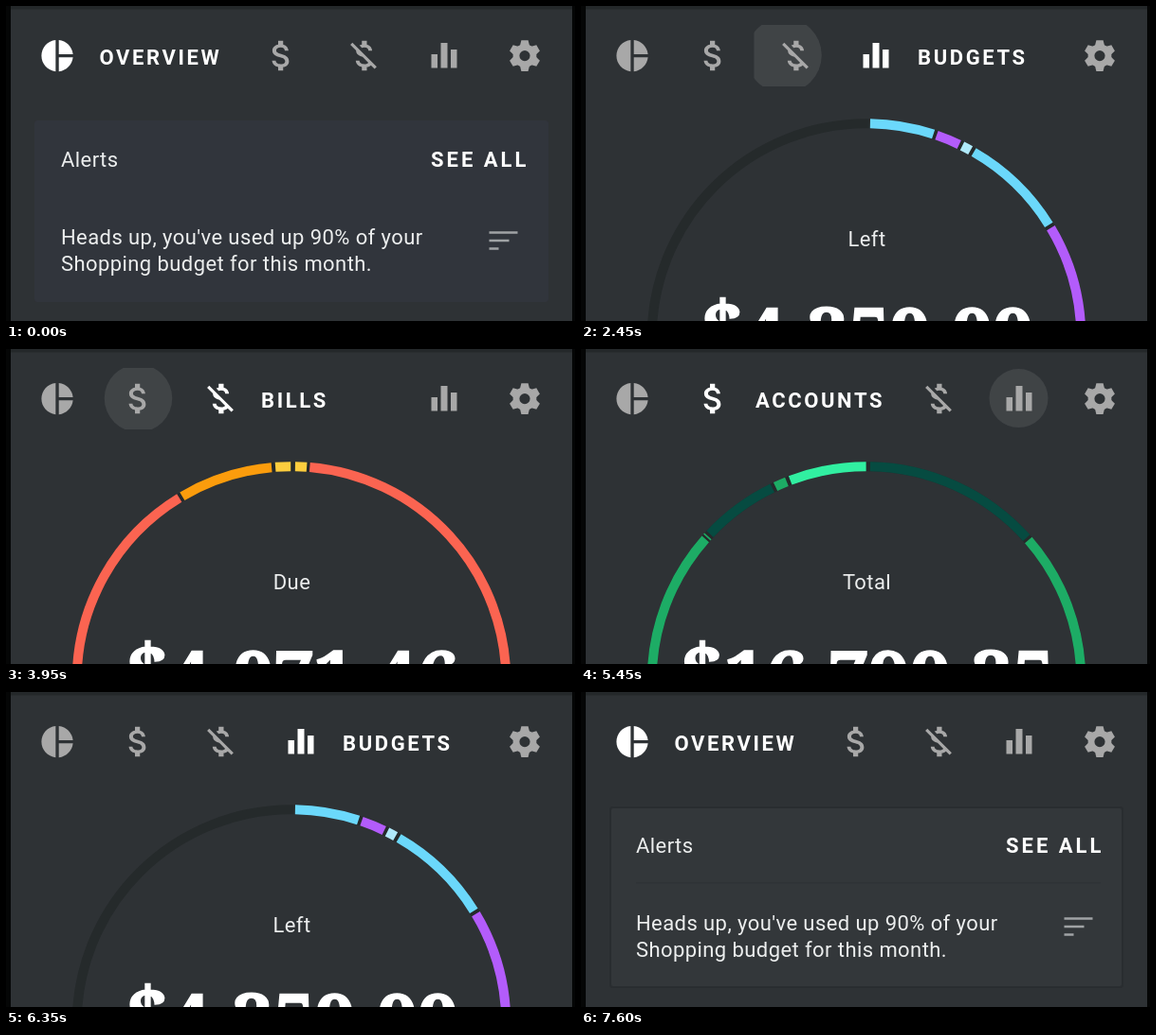
Write an HTML page that moves like this. It is 600 by 333 pixels and loops after 8000 ms.

```html
<!DOCTYPE html>
<html lang="en">
<head>
<meta charset="utf-8">
<title>Finance tabs</title>
<style>
  html, body { margin: 0; width: 100%; height: 100%; overflow: hidden; background: #2e3235; }
  svg { display: block; width: 100%; height: 100%; }
  text { font: 400 22px Roboto, "Open Sans", sans-serif; letter-spacing: .42px; fill: #eceeee; }
  .title { font-weight: 700; letter-spacing: 2.6px; fill: #fff; }
  .label, .amount { text-anchor: middle; }
  .amount { font: 700 77px "Noto Serif", "DejaVu Serif", serif; letter-spacing: 0; fill: #fff; stroke: #fff; stroke-width: 1.5; }
  .sign { font-size: 1.12em; }
  .ring { fill: none; stroke-width: 10; }
</style>
</head>
<body>
<svg viewBox="0 0 600 333">
  <defs>
    <clipPath id="cell"><rect x="-43.5" y="-32.5" width="87" height="65"/></clipPath>
  </defs>
  <rect width="600" height="333" fill="#2e3235"/>

  <g id="overview">
    <rect x="30" y="121" width="542" height="192" rx="3" fill="#292d30"/>
    <rect x="32" y="123" width="538" height="188" rx="2" fill="#33373a"/>
    <rect x="58" y="201" width="490" height="1.5" fill="#2f3336"/>
    <rect id="tint" x="30" y="121" width="542" height="192" rx="3" fill="#31353c"/>
    <text x="58" y="170">Alerts</text>
    <text x="448" y="169.5" class="title" style="letter-spacing:3px">SEE ALL</text>
    <text x="58" y="252">Heads up, you've used up 90% of your</text>
    <text x="58" y="279.5">Shopping budget for this month.</text>
    <path d="M509.5 239.5h30M509.5 248h21M509.5 256.5h10" stroke="#a0a3a5" stroke-width="2.6"/>
  </g>

  <g id="chart">
    <circle class="ring" cx="301" cy="350.5" r="226.3" stroke="#252a2b"/>
    <g id="arcs" transform="rotate(-90 301 350.5)"></g>
    <text id="label" class="label" x="301.5" y="253.5"></text>
    <text class="amount" x="301" y="374"><tspan class="sign">$</tspan><tspan id="amount"></tspan></text>
  </g>

  <g id="tabs"></g>

  <rect width="600" height="3.5" fill="#24282a"/>
  <rect width="5" height="333" fill="#050606"/>
  <rect x="597" width="3" height="333" fill="#050606"/>
</svg>
<script>
const LOOP = 8000, TAB_TIME = 300, RING_DELAY = 155, RING_TIME = 420, TITLE_GAP = 151;
const $ = id => document.getElementById(id);
const clamp = v => Math.min(1, Math.max(0, v));
const mix = (a, b, k) => a + (b - a) * k;

function make(parent, tag, attrs = {}, content = '') {
  const el = document.createElementNS('http://www.w3.org/2000/svg', tag);
  for (const key in attrs) el.setAttribute(key, attrs[key]);
  el.innerHTML = content;
  return parent.appendChild(el);
}

// Icons on a 24 unit grid
const glyph = (d, scale) => `<path transform="scale(${scale}) translate(-12 -12)" d="${d}"/>`;
const pie = 'M11 2v20c-5.07-.5-9-4.79-9-10s3.93-9.5 9-10zM13.03 2v8.99H22c-.47-4.74-4.24-8.52-8.97-8.99z' +
  'M13.03 13.01V22c4.74-.47 8.5-4.25 8.97-8.99z';
const dollar = 'M11.8 10.9c-2.27-.59-3-1.2-3-2.15 0-1.09 1.01-1.85 2.7-1.85 1.78 0 2.44.85 2.5 2.1h2.21' +
  'c-.07-1.72-1.12-3.3-3.21-3.81V3h-3v2.16c-1.94.42-3.5 1.68-3.5 3.61 0 2.31 1.91 3.46 4.7 4.13 ' +
  '2.5.6 3 1.48 3 2.41 0 .69-.49 1.79-2.7 1.79-2.06 0-2.87-.92-2.98-2.1h-2.2c.12 2.19 1.76 3.42 3.68 3.83' +
  'V21h3v-2.15c1.95-.37 3.5-1.5 3.5-3.55 0-2.84-2.43-3.81-4.7-4.4z';
const dollarOff = 'M12.5 6.9c1.78 0 2.44.85 2.5 2.1h2.21c-.07-1.72-1.12-3.3-3.21-3.81V3h-3v2.16' +
  'c-.53.12-1.03.3-1.48.54l1.47 1.47c.41-.17.91-.27 1.51-.27zM5.33 4.06L4.06 5.33 7.5 8.77' +
  'c0 2.08 1.56 3.21 3.91 3.91l3.51 3.51c-.34.48-1.05.91-2.42.91-2.06 0-2.87-.92-2.98-2.1h-2.2' +
  'c.12 2.19 1.76 3.42 3.68 3.83V21h3v-2.15c.96-.18 1.82-.55 2.45-1.12l2.22 2.22 1.27-1.27z';
const bars = '<path d="M-13.5-1.5h6.5v14.5h-6.5zM-3.5-13.5h7v26.500h-7zM7-6.500h6.500v19.500H7z"/>';
const gear = '<circle r="9" fill="none" stroke="currentColor" stroke-width="6.8"/>' +
  [0, 60, 120, 180, 240, 300].map(a =>
    `<path transform="rotate(${a})" d="M-5.2-10L-3.6-16.3H3.6L5.2-10z"/>`).join('');

const tabs = [
  { x: 54, icon: glyph(pie, 1.66), title: 'OVERVIEW', titleX: 98.5 },
  { x: 139.5, icon: glyph(dollar, 1.75), title: 'ACCOUNTS', titleX: 184 },
  { x: 226, icon: glyph(dollarOff, 1.75), title: 'BILLS', titleX: 269 },
  { x: 311, icon: bars, title: 'BUDGETS', titleX: 355 },
  { x: 396, icon: gear, title: '', titleX: 0 }
];
for (const tab of tabs) {
  tab.group = make($('tabs'), 'g');
  const clip = make(tab.group, 'g', { 'clip-path': 'url(#cell)' });
  tab.ripple = make(clip, 'circle', { fill: '#fff', cy: -.5 });
  tab.glyph = make(tab.group, 'g', { fill: 'currentColor' }, tab.icon);
  tab.text = make($('tabs'), 'text', { class: 'title', x: tab.titleX, y: 61.5 }, tab.title);
}

// Ring segments: [from, to, colour] in degrees clockwise from the top
const cyan = '#6bd8fb', ice = '#b0e9fb', purple = '#b35cfb';
const forest = '#064b41', green = '#1dac65', mint = '#31efa1';
const yellow = '#fdcd3e', red = '#fb6451', orange = '#fb9c0c';
const pages = {
  1: { label: 'Total', amount: '16,790.25', arcs: [
    [1, 48.2, forest], [49, 311.4, green], [312, 312.4, green],
    [313.2, 334, forest], [334.9, 338.2, green], [339.2, 359.9, mint]] },
  2: { label: 'Due', amount: '4,071.46', arcs: [
    [1, 4.1, yellow], [4.9, 328.5, red], [329.4, 354.7, orange], [355.7, 359.8, yellow]] },
  3: { label: 'Left', amount: '4,250.00', arcs: [
    [1, 18.2, cyan], [19.1, 25.6, purple], [26.5, 29, ice], [30, 58.2, cyan], [59.2, 96, purple],
    [98, 111, ice], [113, 116, purple], [117, 135, ice], [137, 159, cyan]] }
};
const arcs = pages[3].arcs.map(() =>
  make($('arcs'), 'circle', { class: 'ring', cx: 301, cy: 350.5, r: 226.3, pathLength: 360 }));

const switches = [
  { at: 820, from: 0, to: 3 },
  { at: 2510, from: 3, to: 2 },
  { at: 3970, from: 2, to: 1 },
  { at: 5530, from: 1, to: 3 },
  { at: 7230, from: 3, to: 0 }
];
const presses = [
  { tab: 2, at: 2420, end: 2510, dx: -12, speed: .8, max: 60 },
  { tab: 1, at: 3925, end: 3970, dx: 0, speed: .8, max: 60 },
  { tab: 3, at: 5431, end: 5530, dx: -.5, speed: .8, max: 60 },
  { tab: 0, at: 6735, end: 7230, dx: 0, speed: .09, max: 43 }
];

function drawTabs(t, { from, to }, progress) {
  tabs.forEach((tab, i) => {
    const shift = mix(i > from, i > to, progress) * TITLE_GAP;
    tab.group.setAttribute('transform', `translate(${tab.x + shift} 52.6)`);
    const quick = clamp(progress * 2);
    const active = from === to ? +(i === to) : i === to ? quick : i === from ? 1 - quick : 0;
    const tone = Math.round(mix(168, 255, active));
    tab.glyph.setAttribute('color', `rgb(${tone},${tone},${tone})`);
    tab.text.setAttribute('opacity', active);

    const press = presses.find(p => p.tab === i && t >= p.at && t < p.end + 120);
    tab.ripple.setAttribute('r', press ? Math.min(press.max, 15 + press.speed * (t - press.at)) : 0);
    if (press) {
      tab.ripple.setAttribute('cx', press.dx);
      tab.ripple.setAttribute('opacity', .085 * (1 - clamp((t - press.end) / 120)));
    }
  });
}

function drawChart(page, growth) {
  $('label').textContent = page.label;
  $('amount').textContent = page.amount;
  arcs.forEach((arc, i) => {
    const [start, end, color] = page.arcs[i] || [0, 0, 'none'];
    arc.setAttribute('stroke', growth > 0 ? color : 'none');
    arc.setAttribute('stroke-dasharray', `${(end - start) * growth} 720`);
    arc.setAttribute('stroke-dashoffset', -start * growth);
  });
}

function render(t) {
  const current = switches.filter(s => t >= s.at).pop() || { at: -LOOP, from: 0, to: 0 };
  const elapsed = t - current.at;
  drawTabs(t, current, clamp(elapsed / TAB_TIME));

  const page = pages[current.to];
  $('overview').style.display = page ? 'none' : '';
  $('chart').style.display = page ? '' : 'none';
  if (page) drawChart(page, 1 - (1 - clamp((elapsed - RING_DELAY) / RING_TIME)) ** 2);
  $('tint').setAttribute('opacity', 1 - clamp(t / 650));
}

const began = performance.now();
function tick() {
  render((performance.now() - began) % LOOP);
  requestAnimationFrame(tick);
}
tick();
</script>
</body>
</html>
```
